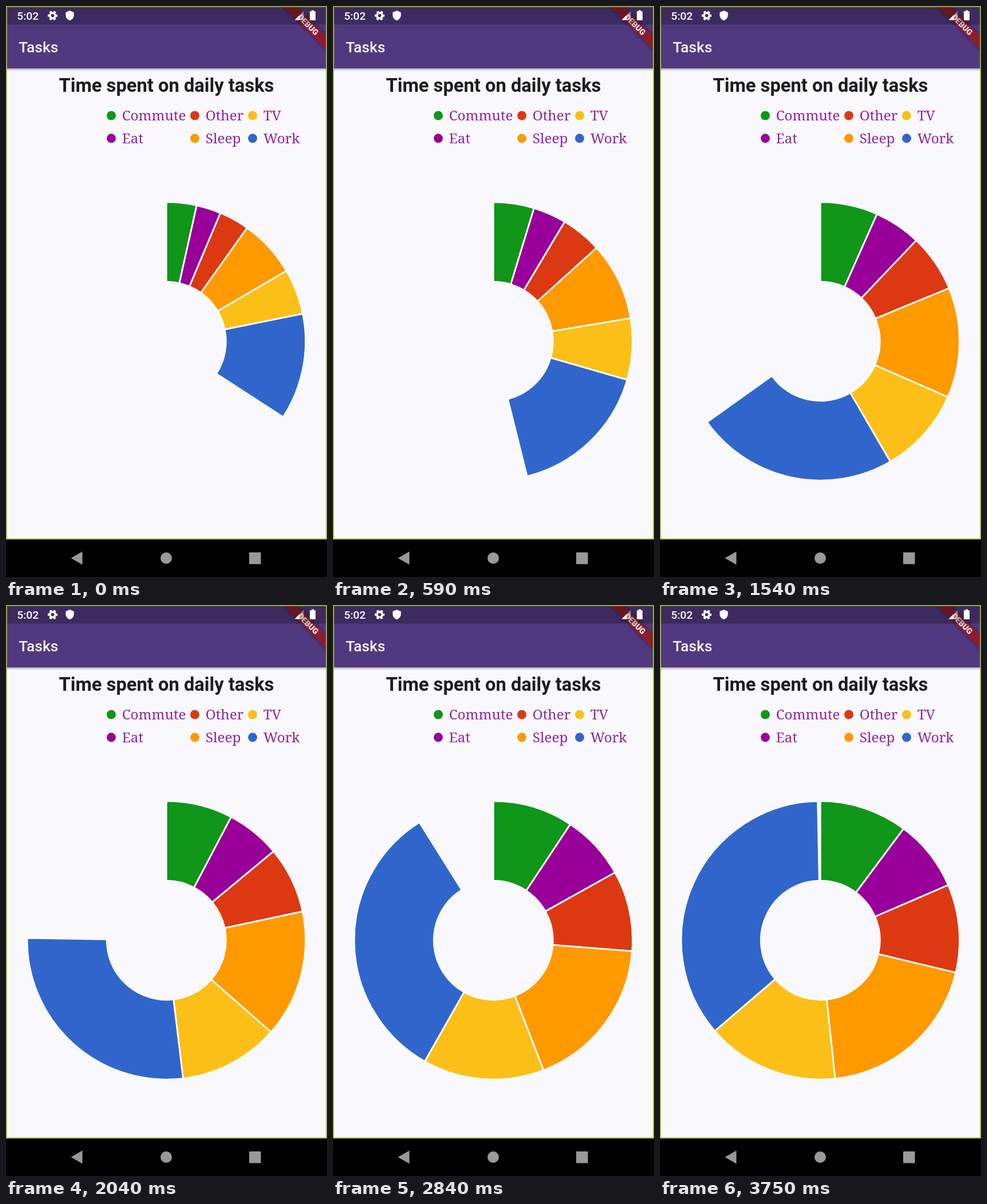
These frames come from a looping animation (561x998 px, 3790 ms). An HTML page:

```html
<!DOCTYPE html>
<html lang="en">
<head>
<meta charset="utf-8">
<title>Time spent on daily tasks</title>
<style>
html, body { margin: 0; width: 100%; height: 100%; overflow: hidden; background: #000; }
svg { display: block; width: 561px; height: 998px; }
text { font-family: Roboto, sans-serif; }
.legend text { font-family: "Noto Serif", serif; font-size: 24.3px; fill: #8e24a0; }
</style>
</head>
<body>
<svg viewBox="0 0 561 998" xmlns="http://www.w3.org/2000/svg">
  <defs>
    <linearGradient id="shade" x2="0" y2="1">
      <stop offset="0" stop-color="#000" stop-opacity=".3"/>
      <stop offset="1" stop-color="#000" stop-opacity="0"/>
    </linearGradient>
    <filter id="soft" x="-20%" y="-80%" width="140%" height="260%">
      <feGaussianBlur stdDeviation="3"/>
    </filter>
    <clipPath id="app"><rect width="561" height="932"/></clipPath>
  </defs>
  <rect width="561" height="998" fill="#000"/>
  <rect width="561" height="932" fill="#f9f9fd"/>
  <rect y="109" width="561" height="5" fill="url(#shade)"/>
  <rect width="561" height="109" fill="#51397f"/>
  <text x="22.3" y="81" font-size="26.3" font-weight="500" fill="#f7f4fb">Tasks</text>
  <text x="280.5" y="150" font-size="32.7" font-weight="700" fill="#1e1c22" text-anchor="middle">Time spent on daily tasks</text>

  <g id="legend" class="legend"></g>
  <g id="pie" stroke="#fff" stroke-width="2.8"></g>

  <g clip-path="url(#app)">
    <g transform="translate(561 0) rotate(45)">
      <rect x="-54.6" y="38.2" width="109.2" height="16.4" opacity=".45" filter="url(#soft)"/>
      <rect x="-54.6" y="38.2" width="109.2" height="16.4" fill="#9e1c2a" opacity=".85"/>
      <text y="51.3" font-size="13.9" font-weight="900" fill="#f6eef0" text-anchor="middle">DEBUG</text>
    </g>
  </g>

  <rect width="561" height="32.5" opacity=".25"/>
  <rect x="1" y="1" width="559" height="930.5" fill="none" stroke="#a6c42a" stroke-width="2" opacity=".85"/>

  <g fill="#fff">
    <text x="19.3" y="24" font-size="19.2" font-weight="500">5:02</text>
    <g fill="none" stroke="#fff" transform="translate(81.5 16.8)">
      <circle r="4.7" stroke-width="3.6"/>
      <circle r="7" stroke-width="3.2" stroke-dasharray="4 3.33" stroke-dashoffset="2"/>
    </g>
    <path d="M111.5 8 L118.7 11.2 V16 C118.7 20.4 115.6 24 111.5 25.2 C107.4 24 104.3 20.4 104.3 16 V11.2 Z"/>
    <path d="M520.5 8.5 V24.5 H504.5 Z" opacity=".4"/>
    <path d="M513 16 V24.5 H504.5 Z"/>
    <path d="M534 7.5 H538 V9.2 H541 V25 H531 V9.2 H534 Z"/>
  </g>

  <g fill="#999">
    <path d="M113.5 965 L133.5 953.5 V976.5 Z"/>
    <circle cx="280" cy="965" r="10"/>
    <rect x="425" y="955" width="20.5" height="20.5" rx="1"/>
  </g>
</svg>
<script>
const LOOP = 3790;
const CX = 280.3, CY = 586, OUTER = 243.3, INNER = 104;
// name, colour, share of the ring at which the slice ends
const tasks = [
  ['Commute', '#109618', 0.1023],
  ['Eat', '#990099', 0.1857],
  ['Other', '#dc3912', 0.2882],
  ['Sleep', '#ff9900', 0.4846],
  ['TV', '#fbbf18', 0.639],
  ['Work', '#3066cc', 1]
];
// step, total sweep in degrees
const sweeps = [[0, 123], [14, 166], [27, 204.7], [37, 234.5], [49, 270.9], [68, 327.9], [78.3, 358.9], [91, 358.9]];
const columns = [184, 330, 431];

function add(parent, tag, attrs) {
  const el = document.createElementNS('http://www.w3.org/2000/svg', tag);
  for (const key in attrs) el.setAttribute(key, attrs[key]);
  return parent.appendChild(el);
}

const legend = document.getElementById('legend');
const pie = document.getElementById('pie');
const slices = tasks.map(([name, fill], i) => {
  const x = columns[i >> 1], y = 191.5 + (i % 2) * 39.8;
  add(legend, 'circle', { cx: x, cy: y, r: 8, fill });
  add(legend, 'text', { x: x + 18.7, y: y + 8.7 }).textContent = name;
  return add(pie, 'path', { fill });
});

function point(radius, degrees) {
  const a = degrees * Math.PI / 180;
  return (CX + radius * Math.sin(a)).toFixed(2) + ' ' + (CY - radius * Math.cos(a)).toFixed(2);
}

function ringSlice(from, to) {
  const large = to - from > 180 ? 1 : 0;
  return `M${point(OUTER, from)} A${OUTER} ${OUTER} 0 ${large} 1 ${point(OUTER, to)}` +
    ` L${point(INNER, to)} A${INNER} ${INNER} 0 ${large} 0 ${point(INNER, from)} Z`;
}

function sweepAt(step) {
  const i = sweeps.findIndex(([s]) => s > step);
  const [s0, a0] = sweeps[i - 1], [s1, a1] = sweeps[i];
  return a0 + (a1 - a0) * (step - s0) / (s1 - s0);
}

// 24 steps per second, each starting on a whole centisecond
function stepAt(ms) {
  return Math.max(0, Math.ceil((Math.floor(ms / 10) + 0.3) * 0.24) - 1);
}

function draw(ms) {
  const sweep = sweepAt(stepAt(ms % LOOP));
  let from = 0;
  tasks.forEach(([, , end], i) => {
    const to = end * sweep;
    slices[i].setAttribute('d', ringSlice(from, to));
    from = to;
  });
}

let start;
function tick(now) {
  if (start === undefined) start = now;
  draw(Math.max(0, now - start));
  requestAnimationFrame(tick);
}
draw(0);
requestAnimationFrame(tick);
</script>
</body>
</html>
```
